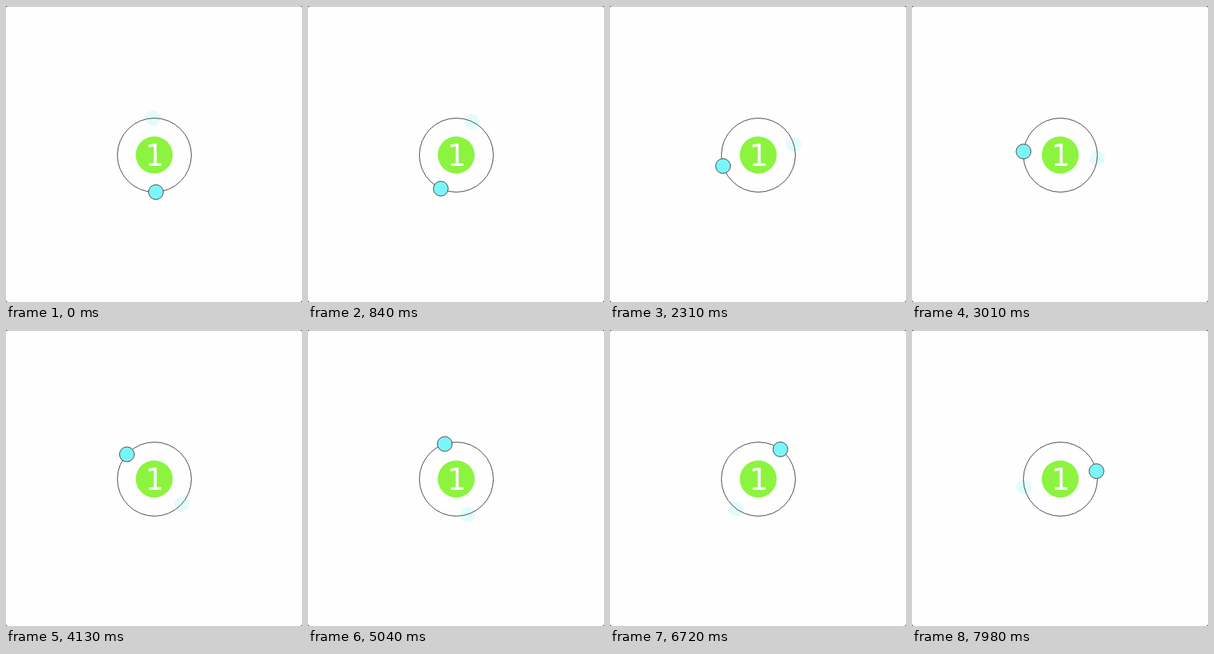
An HTML page for the animation above (8 s loop, 400 by 400 pixels).

```html
<!DOCTYPE html>
<html lang="en">
<head>
<meta charset="utf-8">
<title>Orbit</title>
<style>
  html, body { margin: 0; width: 100%; height: 100%; overflow: hidden; background: #fff; }
  svg { display: block; width: 100%; height: 100%; }
  text { font: 40px "DejaVu Sans", Verdana, sans-serif; }
</style>
</head>
<body>
<svg viewBox="0 0 400 400">
  <rect width="400" height="400" fill="#fefefe"/>
  <rect width="400" height="1" fill="#c4c4c4"/>
  <path d="M0 0h2L0 2zM400 0h-2l2 2zM0 400h2l-2-2zM400 400h-2l2-2z" fill="#555"/>
  <circle id="ghost" r="10.3" fill="#e2fcfe"/>
  <circle cx="200.5" cy="201.5" r="50" fill="none" stroke="#444" stroke-width="1"/>
  <circle cx="200.3" cy="201.3" r="25" fill="#8cf43f"/>
  <text x="201" y="216" text-anchor="middle" fill="#fff">1</text>
  <circle id="ball" r="10" fill="#7af6fa" stroke="#444" stroke-width="1"/>
</svg>
<script>
const LOOP = 8000, STEP = 70;
const START = 87.6, TURN = 2.28; // degrees, degrees per step
const CX = 200.5, CY = 201.5, R = 50;
const ball = document.getElementById('ball');
const ghost = document.getElementById('ghost');

function place(el, deg) {
  const a = deg * Math.PI / 180;
  el.setAttribute('cx', (CX + R * Math.cos(a)).toFixed(2));
  el.setAttribute('cy', (CY + R * Math.sin(a)).toFixed(2));
}

function draw(ms) {
  const angle = START + TURN * Math.floor(ms / STEP);
  place(ball, angle);
  place(ghost, angle + 180);
}

const t0 = performance.now();
function tick() {
  draw((performance.now() - t0) % LOOP);
  requestAnimationFrame(tick);
}
tick();
</script>
</body>
</html>
```
